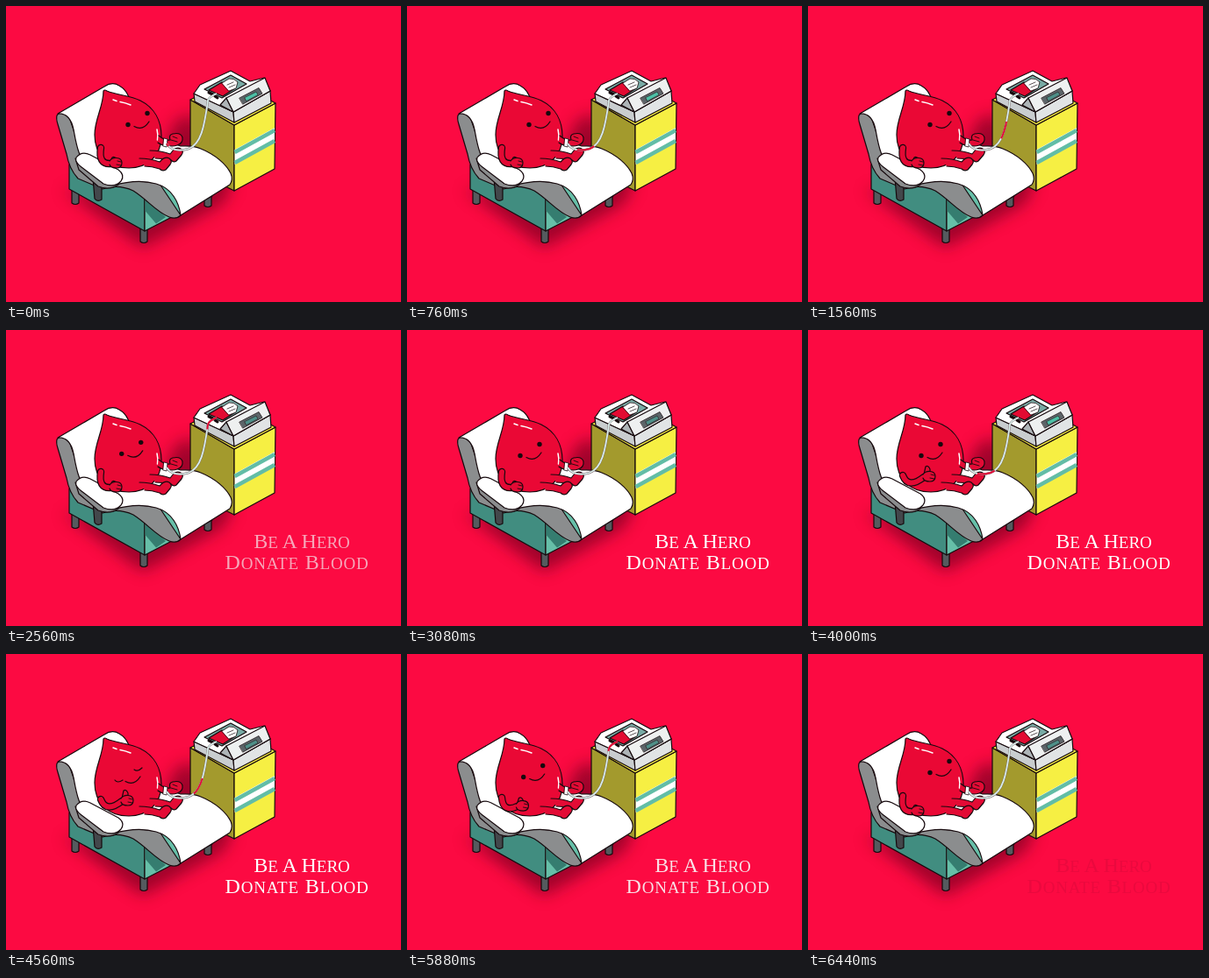
An HTML page that plays this animation: 450x338 px, repeating every 6520 ms.

```html
<!DOCTYPE html>
<html lang="en">
<head>
<meta charset="utf-8">
<title>Be A Hero</title>
<style>
html, body { margin: 0; width: 100%; height: 100%; overflow: hidden; background: #fc0a42; }
svg { display: block; width: 100vw; height: 100vh; }
.ink { stroke: #16090d; stroke-width: 1.2; stroke-linejoin: round; stroke-linecap: round; }
.line { fill: none; }
text { font-family: "Liberation Serif", "Times New Roman", serif; font-size: 24px; text-anchor: middle; }
.s { font-size: 19px; }
</style>
</head>
<body>
<svg viewBox="0 0 450 338">
  <defs>
    <filter id="soft" x="-30%" y="-30%" width="160%" height="160%"><feGaussianBlur stdDeviation="9"/></filter>
    <path id="dropShape" d="M111 97Q112 95 115 97C127 102 141 102 153 108C169 116 177 131 177 149C177 171 161 185 140 185C116 185 101 170 101 147C101 129 111 115 111 97Z"/>
    <path id="tube" pathLength="100" d="M183 157C188 165 198 166 208 163C222 158 226 138 230 108C231 104 235 102 240 100"/>
    <g id="words">
      <text x="337" y="248.500">B<tspan class="s">E</tspan> A H<tspan class="s">ERO</tspan></text>
      <text x="331.500" y="272.500" letter-spacing=".8">D<tspan class="s">ONATE</tspan> B<tspan class="s">LOOD</tspan></text>
    </g>
  </defs>

  <rect width="450" height="338" fill="#fc0a42"/>
  <path filter="url(#soft)" fill="#7d0020" opacity=".72" d="M64 209L156 276L247 226L258 205L212 122L192 132L160 220Z"/>

  <!-- cabinet -->
  <g class="ink">
    <path fill="#a39a2d" d="M210 107L260 136V211L210 186Z"/>
    <path fill="#f6ef43" d="M260 136L307 111L306 186L260 211Z"/>
    <path fill="#f6ef43" d="M210 107L257 83L307 111L260 136Z"/>
  </g>
  <path fill="#fff" d="M260.600 164L306 139V156L260.600 181Z"/>
  <path stroke="#62bda6" stroke-width="4.500" d="M260.600 167L306 142M260.600 179L306 154"/>

  <!-- machine -->
  <g class="ink">
    <path fill="#c9cdcf" d="M214 100L215 109L260 133L259 121Z"/>
    <path fill="#e1e4e5" d="M259 121L260 133L302 111L301 97Z"/>
    <path fill="#fff" d="M214 100L221 90L256 74L278 86L294 82L301 97L259 121Z"/>
    <path fill="#78aaa4" d="M226 95L256 79L274 89L246 105Z"/>
    <path fill="#aeb4b7" d="M251 105L244 113L259 121Z"/>
    <path fill="#eef0f0" d="M251 105L295 82L301 97L259 121Z"/>
    <path fill="#e30b32" d="M231 96L246 87L261 94L247 103Z"/>
    <path fill="#fff" stroke-width=".8" d="M246 88L254 83Q260 82 264 87L262 94L254 97Z"/>
    <path class="line" stroke-width=".7" d="M252 90L259 87M254 93L261 90"/>
    <path class="line" stroke-width="3" d="M231 99L235 101M238 103L241 105"/>
    <path fill="#5c6468" stroke-width=".7" d="M266 105L288 93.500L292 100L270 112Z"/>
    <path id="screen" stroke-width=".5" d="M272 104.500L285 98L287 101.500L274 108.500Z"/>
  </g>

  <!-- bed -->
  <g class="ink">
    <path fill="#555a5e" d="M75 207H83V225Q79 228 75 225ZM153 251H161V269Q157 272 153 269ZM226 216H234V228Q230 231 226 228Z"/>
    <path fill="#418d80" d="M72 181L72 209L158 257V205L105 190Z"/>
    <path fill="#66bfa8" d="M158 257L235 217V202L158 205Z"/>
    <path fill="#357d70" stroke="none" d="M158.600 219L182 241L171 248.500L158.600 234Z"/>
    <path fill="#8b8d8e" d="M58 125Q61 120 70 121L85 165L100 190L146 199L175 203L199 239Q194 244 186 241C171 235 161 221 145 211Q128 203 110 209L82 197Q72 186 69 169L59 135Q57 129 58 125Z"/>
    <path fill="#fff" d="M59 123L112 92Q121 86 129 91Q136 95 139 102L155 145L199 160Q213 159 222 163C239 170 251 181 256 191Q259 198 255 204L199 239C197 224 189 208 171 203C153 198 136 201 122 205L99 190C83 178 80 158 77 141Q73 122 59 123Z"/>
  </g>

  <!-- drop -->
  <use href="#dropShape" class="ink" fill="#ea0835"/>
  <path fill="none" stroke="#fff" stroke-width="1.500" stroke-linecap="round" d="M122 107L126 108.500M130 109.500Q136 110.500 142 113M172 141Q173.500 147 172.500 153"/>

  <!-- legs -->
  <g class="ink" fill="#e30b35">
    <path d="M164 165Q176 165 187 169L191 164Q195 161 199 163Q203 166 200 170L194 177Q191 179 188 176Q179 174 170 174"/>
    <path d="M152 174Q164 174 175 178L178 175Q182 172 186 174Q190 177 187 181L182 187Q178 189 175 186Q166 183 158 183"/>
  </g>

  <!-- arm with needle -->
  <g class="ink" fill="#e30b35">
    <path d="M174 148Q181 154 187 153Q185 147 190 146Q199 144 201 150Q202 157 195 159Q189 161 185 159Q178 160 173 156"/>
    <path class="line" stroke-width=".9" d="M190 149L195 151M188 153L195 155"/>
    <path fill="#fff" stroke-width=".8" d="M180 151L184 152L183 161L179 160Z"/>
  </g>
  <use href="#tube" fill="none" stroke="#73555e" stroke-width="2.400"/>
  <use href="#tube" fill="none" stroke="#d8efeb" stroke-width="1.800"/>
  <use href="#tube" id="pulse" fill="none" stroke="#e30b35" stroke-width="1.900" stroke-dasharray="20 400"/>

  <!-- armrest -->
  <g class="ink">
    <path fill="#43474b" d="M99 196L109 200V221Q104 224 101 220Z"/>
    <path fill="#8b8d8e" d="M79 174L83 187L105 206Q118 211 128 204L130 198Z"/>
    <path fill="#fff" d="M80 173Q86 165 96 170L128 187Q136 193 131 200Q124 208 111 203L86 184Q78 178 80 173Z"/>
  </g>

  <!-- near arm -->
  <path id="armInk" fill="none" stroke="#16090d" stroke-width="8.400" stroke-linecap="round"/>
  <path id="armRed" fill="none" stroke="#e30934" stroke-width="6" stroke-linecap="round"/>
  <g id="hand" class="ink" fill="#e30b35">
    <path id="thumb"/>
    <path d="M-6 -2Q-3 -6 2 -5.500Q8 -5 8 0Q8 6 2 6Q-5 6 -6 2"/>
    <path class="line" stroke-width=".9" d="M3 -2L7 -1M2 2L7 3"/>
  </g>

  <g id="face" class="ink">
    <g id="eyes" fill="#16090d" stroke="none"><circle cx="139" cy="135.500" r="2.700"/><circle cx="161" cy="122.500" r="2.700"/></g>
    <path id="lids" class="line" d="M134 136Q137 140 143 136M156 124Q160 127 165 122"/>
    <path class="line" d="M146 137.500Q156 143 163 132"/>
  </g>

  <use href="#words" id="dim" fill="#b90833"/>
  <use href="#words" id="lit" fill="#fff"/>
</svg>
<script>
const LOOP = 6520;
const $ = id => document.getElementById(id);
const set = (id, name, value) => $(id).setAttribute(name, value);
const ramp = (t, a, b) => Math.max(0, Math.min(1, (t - a) / (b - a)));
const ease = (t, a, b) => { const k = ramp(t, a, b); return k * k * (3 - 2 * k); };
const mix = (a, b, k) => a + (b - a) * k;

function draw(t) {
  const turn = ease(t, 2100, 2800) - ease(t, 5600, 6280);
  set('face', 'transform', `translate(${-10 * turn} ${8 * turn})`);
  const shut = t > 4320 && t < 4880;
  set('eyes', 'opacity', shut ? 0 : 1);
  set('lids', 'opacity', shut ? 1 : 0);

  const up = ease(t, 3360, 3760) - ease(t, 5560, 6200);
  const x = mix(124, 137, up), y = mix(179, 167, up);
  const arm = `M108 ${mix(162, 166, up)}Q${mix(105, 114, up)} ${mix(181, 182, up)} ${x - 5} ${y + 1}`;
  set('armInk', 'd', arm);
  set('armRed', 'd', arm);
  set('hand', 'transform', `translate(${x} ${y})`);
  const tip = mix(-6, -11, up);
  set('thumb', 'd', `M-5 -2L-3 ${tip}Q0 ${tip - 2} 2 ${tip + 3}L2 -3Z`);

  // Blood travels from the arm to the machine twice per loop.
  const beat = t % (LOOP / 2);
  set('pulse', 'stroke-dashoffset', 16.4 - beat * .0384);
  set('screen', 'fill', Math.floor(t / 815) % 2 ? '#4f8f88' : '#4dc0a6');

  const show = ramp(t, 2280, 2720);
  set('lit', 'opacity', show * (1 - ramp(t, 5800, 6430)));
  set('dim', 'opacity', .4 * show * (1 - ramp(t, 6400, 6520)));
}

const start = performance.now();
function tick() {
  draw((performance.now() - start) % LOOP);
  requestAnimationFrame(tick);
}
tick();
</script>
</body>
</html>
```
